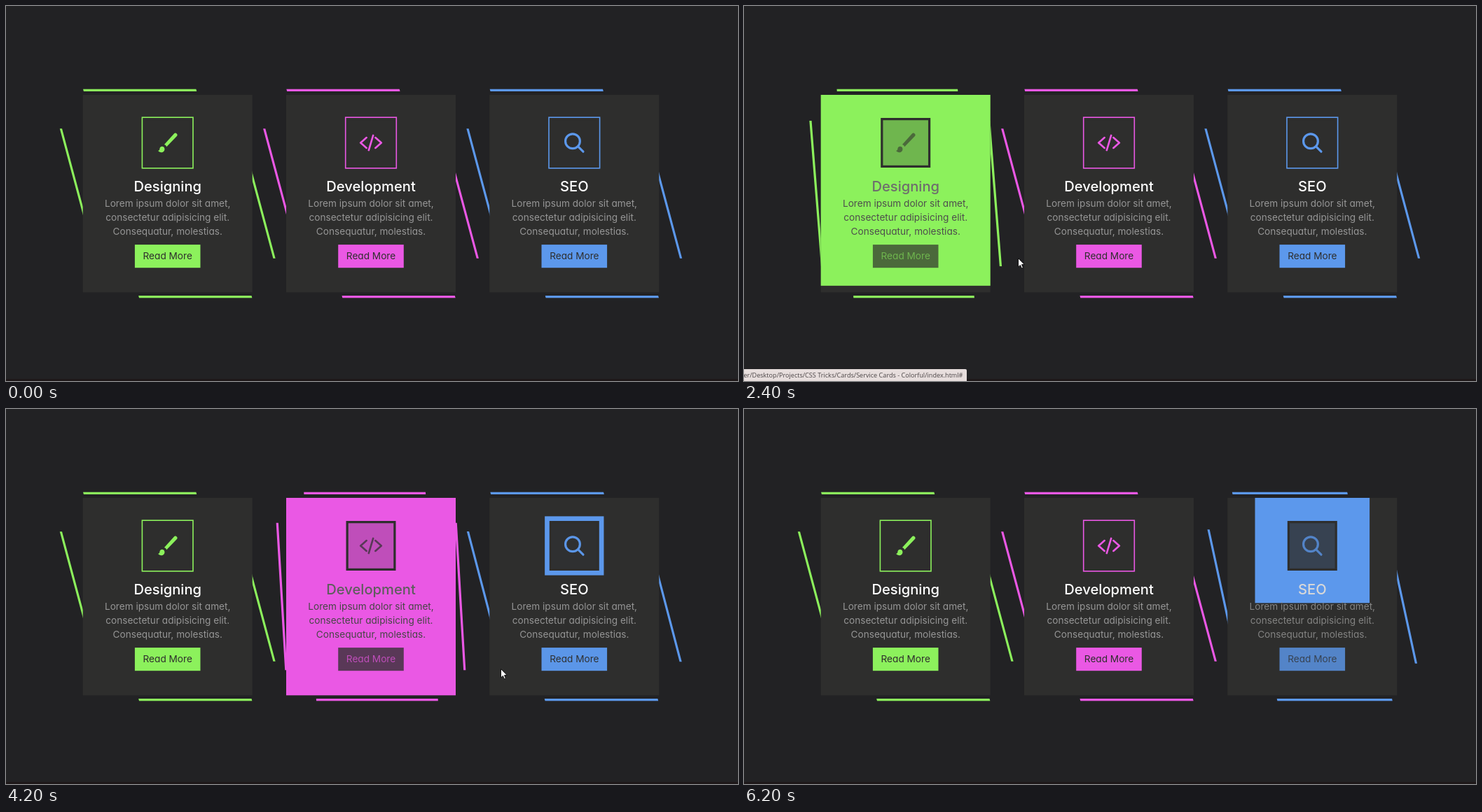
An HTML page for the animation above (6.4 s loop, 1045 px wide and 536 px high).

```html
<!DOCTYPE html>
<html lang="en">
<head>
<meta charset="utf-8">
<title>Service cards</title>
<style>
  html, body { margin: 0; width: 100%; height: 100%; overflow: hidden; background: #222224; }
  svg { display: block; width: 100vw; height: 100vh; }
  .card text { font-family: Inter, "Open Sans", sans-serif; font-feature-settings: "cv11"; font-size: 16.9px; text-anchor: middle; }
  .card .title { font-size: 25px; font-weight: 500; }
  .status { font: 9.1px "Open Sans", "Noto Sans", sans-serif; text-anchor: end; fill: #4b4546; }
  .glyph { stroke-linecap: round; stroke-linejoin: round; }
</style>
</head>
<body>
<svg id="stage" viewBox="0 0 1045 536">
  <defs><clipPath id="cardClip"><rect x="-150" y="-175" width="300" height="350"/></clipPath></defs>
  <rect width="1045" height="536" fill="#222224"/>
  <rect y="533" width="1045" height="3" fill="#1e1819"/>
  <g id="cards"></g>
  <g id="status">
    <path d="M0 519H316Q318 519 318 521V536H0Z" fill="#e7dedd"/>
    <text class="status" x="312.5" y="531">er/Desktop/Projects/CSS Tricks/Cards/Service Cards - Colorful/index.html#</text>
  </g>
  <g id="pointer" fill="#fff" stroke="#111" stroke-width="1" stroke-linejoin="round">
    <path id="arrow" d="M.5 .5V13L3.4 10.4L5.3 14.8L7.4 13.9L5.5 9.6H9.3Z"/>
    <path id="hand" d="M-1.5 1Q0 -.8 1.5 1V7Q3 5.6 4 7.2Q5.6 6 6.5 7.8Q8.4 7.2 8.4 9.5V13Q8.2 15.5 6.8 17.5V19H-1V17.3L-4.6 12Q-5.8 9.6 -3.8 9.6L-1.5 11.6Z"/>
  </g>
</svg>
<script>
const LOOP = 6400, STEP = 200, FADE = 500;
const SCALE = 0.8067;
const DARK = [46, 46, 45], WHITE = [255, 255, 255], GREY = [150, 150, 150];

const GLYPHS = {
  brush: `<path class="ink" d="M452.4 59.6a40.5 40.5 0 0 0-57.3 0L184 294.7c23.1 4.7 46.1 27.3 49.3 49.3L452.4 116.9a40.5 40.5 0 0 0 0-57.3ZM138 336c-29.9 0-54 24.5-54 54.9 0 24-20.9 36.5-36 36.5C64.6 449.7 92.8 464 120 464c39.8 0 72-32.7 72-73.1 0-30.4-24.1-54.9-54-54.9Z"/>`,
  code: `<path class="line" stroke-width="40" d="M160 368L32 256L160 144M352 368L480 256L352 144M304 96L208 416"/>`,
  search: `<path class="line" stroke-width="48" d="M64 221a157 157 0 1 0 314 0a157 157 0 1 0-314 0M338 338L448 448"/>`
};

// enter and leave: when the pointer crosses the edge of the card
const CARDS = [
  { title: "Designing", glyph: "brush", color: [140, 241, 92], x: 230.7, enter: 365, leave: 2298 },
  { title: "Development", glyph: "code", color: [234, 88, 228], x: 521, enter: 2454, leave: 4115 },
  { title: "SEO", glyph: "search", color: [92, 152, 236], x: 811.3, enter: 4182, leave: 5944 }
];

const PATH = [
  [200, 148, 436], [400, 152, 401], [800, 159, 377], [1400, 190, 366], [1800, 211, 359],
  [2200, 290, 358], [2400, 391, 360], [2600, 445, 362], [3000, 500, 384], [3600, 560, 385],
  [4000, 612, 378], [4200, 706, 371], [4600, 752, 383], [5200, 790, 388], [5800, 770, 392],
  [6000, 758, 512]
];

const $ = id => document.getElementById(id);
const clamp = v => Math.min(1, Math.max(0, v));
const lerp = (a, b, p) => a + (b - a) * p;
const mix = (a, b, p) => `rgb(${a.map((v, i) => Math.round(lerp(v, b[i], p)))})`;

// cubic-bezier(.25, .1, .25, 1)
function ease(x) {
  let lo = 0, hi = 1;
  for (let i = 0; i < 24; i++) {
    const s = (lo + hi) / 2;
    if (0.75 * s * (1 - s) + s ** 3 < x) lo = s; else hi = s;
  }
  const s = hi, r = 1 - s;
  return x >= 1 ? 1 : x <= 0 ? 0 : 0.3 * s * r * r + 3 * s * s * r + s ** 3;
}

function setAttrs(el, attrs) {
  for (const name in attrs) el.setAttribute(name, attrs[name]);
}

function buildCard(card) {
  const g = document.createElementNS("http://www.w3.org/2000/svg", "g");
  setAttrs(g, { class: "card", transform: `translate(${card.x} 268.1) scale(${SCALE})` });
  const lines = ["Lorem ipsum dolor sit amet,", "consectetur adipisicing elit.", "Consequatur, molestias."];
  g.innerHTML = `
    <path class="frame" fill="${mix(card.color, card.color, 0)}"/>
    <rect x="-150" y="-175" width="300" height="350" fill="${mix(DARK, DARK, 0)}"/>
    <g clip-path="url(#cardClip)"><rect class="spread" fill="${mix(card.color, card.color, 0)}"/></g>
    <rect x="-44" y="-134" width="88" height="88" fill="${mix(DARK, DARK, 0)}"/>
    <rect class="inner" x="-40" y="-130" width="80" height="80"/>
    <g class="glyph" transform="translate(0 -90) scale(.082) translate(-256 -256)">${GLYPHS[card.glyph]}</g>
    <text class="title" y="-4">${card.title}</text>
    <g class="copy">${lines.map((s, i) => `<text y="${23 + 25 * i}">${s}</text>`).join("")}</g>
    <rect class="button" x="-58" y="90.5" width="116" height="41"/>
    <text class="label" y="116.5">Read More</text>`;
  $("cards").append(g);
  card.part = name => g.querySelector("." + name);
}

const bar = (cx, cy, w, h) => `M${cx - w / 2} ${cy - h / 2}h${w}v${h}h${-w}z`;

function drawCard(card, t) {
  const p = ease(clamp((t - card.enter) / FADE)) - ease(clamp((t - card.leave) / FADE));
  const w = lerp(200, 220, p), h = lerp(230, 270, p);
  setAttrs(card.part("frame"), {
    d: bar(0, -183, w, 4) + bar(0, 183, w, 4) + bar(-158, 0, 4, h) + bar(158, 0, 4, h),
    transform: `skewX(${lerp(15, 0, p)})`
  });

  const half = 44 + lerp(2, 300, p);
  setAttrs(card.part("spread"), { x: -half, y: -90 - half, width: 2 * half, height: 2 * half });

  const toDark = mix(card.color, DARK, p), toColor = mix(DARK, card.color, p);
  const ink = card.part("ink"), line = card.part("line");
  if (ink) ink.setAttribute("fill", toDark);
  if (line) setAttrs(line, { fill: "none", stroke: toDark });
  card.part("inner").setAttribute("fill", toColor);
  card.part("button").setAttribute("fill", toDark);
  card.part("label").setAttribute("fill", toColor);
  card.part("title").setAttribute("fill", mix(WHITE, DARK, p));
  card.part("copy").setAttribute("fill", mix(GREY, DARK, p));
}

function show(id, visible) {
  $(id).setAttribute("visibility", visible ? "visible" : "hidden");
}

function drawPointer(t) {
  const last = PATH.length - 1;
  const inside = t >= PATH[0][0] && t <= PATH[last][0];
  const onLink = t >= 1400 && t < 2200;
  show("arrow", inside && !onLink);
  show("hand", inside && onLink);
  show("status", t >= 1400 && t < 2600);
  if (!inside) return;
  const i = Math.min(last - 1, PATH.findLastIndex(k => k[0] <= t));
  const [a, b] = [PATH[i], PATH[i + 1]];
  const p = (t - a[0]) / (b[0] - a[0]);
  $("pointer").setAttribute("transform", `translate(${lerp(a[1], b[1], p)} ${lerp(a[2], b[2], p)})`);
}

function render(ms) {
  const t = Math.floor((ms % LOOP) / STEP) * STEP;
  CARDS.forEach(card => drawCard(card, t));
  drawPointer(t);
}

CARDS.forEach(buildCard);
render(0);
let start;
requestAnimationFrame(function tick(now) {
  start ??= now;
  render(now - start);
  requestAnimationFrame(tick);
});
</script>
</body>
</html>
```
